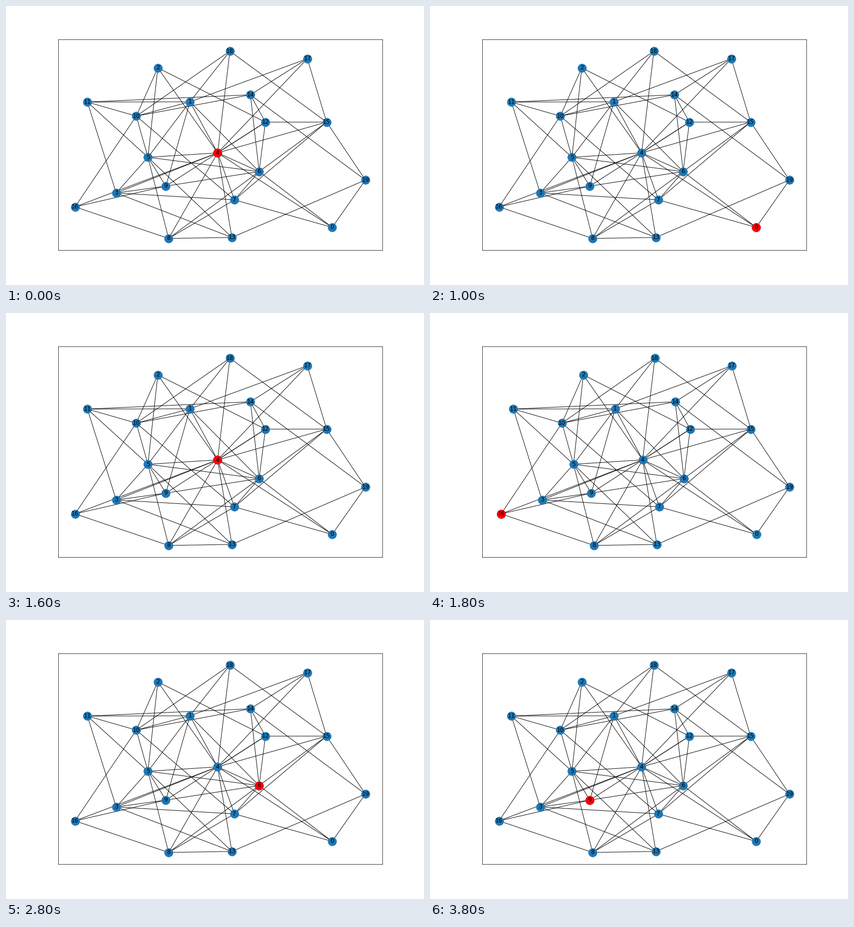
Recreate the animation shown at these times as a matplotlib script. Size 864 px wide and 576 px high, loop 4 s.

```python
import matplotlib.pyplot as plt
from matplotlib.animation import FuncAnimation
from matplotlib.collections import LineCollection

W, H, DPI = 864, 576, 72
LEFT, RIGHT, TOP, BOTTOM = 0.125 * W, 0.9 * W, 0.12 * H, 0.875 * H
SIZE = 300
RADIUS = SIZE ** 0.5 / 2
MARGIN = 0.05
DEGREE = 4

# Node centres in stage pixels, y down
POS = [
    (674.2, 457), (380.2, 197.8), (313.8, 127.7), (227.8, 386), (437.4, 303.2),
    (293.4, 312.3), (523.2, 341.8), (472.2, 400.3), (336.1, 479.9), (330.4, 371.8),
    (269.3, 227.3), (168.2, 198.3), (536.2, 239.8), (466.9, 477.8), (505.2, 183.3),
    (662.7, 239.7), (142.7, 414.7), (622.8, 108.8), (462.8, 93.2), (742.9, 359.3),
]

# Links a newcomer picks itself; the rest go to the busiest older nodes
PICKS = {
    6: [0, 1], 7: [0, 3, 6], 9: [1, 3, 5, 6], 10: [1, 2, 5, 7], 11: [1, 3, 5, 10],
    12: [2, 4, 6, 9], 13: [3, 8], 14: [6, 10, 11, 12], 15: [4, 6, 7, 12],
    16: [8, 9, 10], 17: [1, 14, 15], 18: [1, 10, 15], 19: [0, 13, 14, 15],
}

# Nodes the walker heads for
STOPS = [4, 19, 7, 0, 19, 4, 16, 16, 10, 7, 6, 8, 4, 3, 5, 9]


def grow(count):
    """Preferential attachment: every new node links to DEGREE older ones."""
    links = [set() for _ in range(count)]
    for new in range(DEGREE, count):
        targets = list(PICKS.get(new, []))
        busiest = sorted(range(new), key=lambda n: (len(links[n]), n), reverse=True)
        targets += [n for n in busiest if n not in targets][:DEGREE - len(targets)]
        for old in targets:
            links[new].add(old)
            links[old].add(new)
    return links


def route(links, stops):
    """Visit the stops, passing through the busiest shared neighbour if needed."""
    path = stops[:1]
    for a, b in zip(stops, stops[1:]):
        if b not in links[a]:
            path.append(max(links[a] & links[b], key=lambda n: len(links[n])))
        path.append(b)
    return path


def view(lo, hi, c):
    """Axis limits that also fit the marker at c, with a margin on both sides."""
    pad = (hi - lo) * MARGIN / (1 + 2 * MARGIN)
    a, b = min(lo + pad, c - RADIUS), max(hi - pad, c + RADIUS)
    m = (b - a) * MARGIN
    return a - m, b + m


links = grow(len(POS))
walk = route(links, STOPS)

plt.rcParams["font.family"] = "DejaVu Sans"
fig = plt.figure(figsize=(W / DPI, H / DPI), dpi=DPI, facecolor="white")
ax = fig.add_axes([LEFT / W, 1 - BOTTOM / H, (RIGHT - LEFT) / W, (BOTTOM - TOP) / H])
ax.set_xticks([])
ax.set_yticks([])

edges = [(POS[a], POS[b]) for a, ends in enumerate(links) for b in sorted(ends) if a < b]
ax.add_collection(LineCollection(edges, colors="black", linewidths=1, zorder=1),
                  autolim=False)
ax.scatter(*zip(*POS), s=SIZE, c="#1f77b4", linewidths=1, zorder=2)
walker = ax.scatter(*POS[walk[0]], s=SIZE, c="red", linewidths=1, zorder=2)
for n, (x, y) in enumerate(POS):
    ax.text(x, y, str(n), size=12, ha="center", va="center", clip_on=True, zorder=3)


def step(i):
    x, y = POS[walk[i]]
    walker.set_offsets([(x, y)])
    ax.set_xlim(*view(LEFT, RIGHT, x))
    ax.set_ylim(*reversed(view(TOP, BOTTOM, y)))
    return [walker]


anim = FuncAnimation(fig, step, frames=len(walk), interval=200, repeat=True,
                     repeat_delay=0, blit=False)
plt.show()
```
